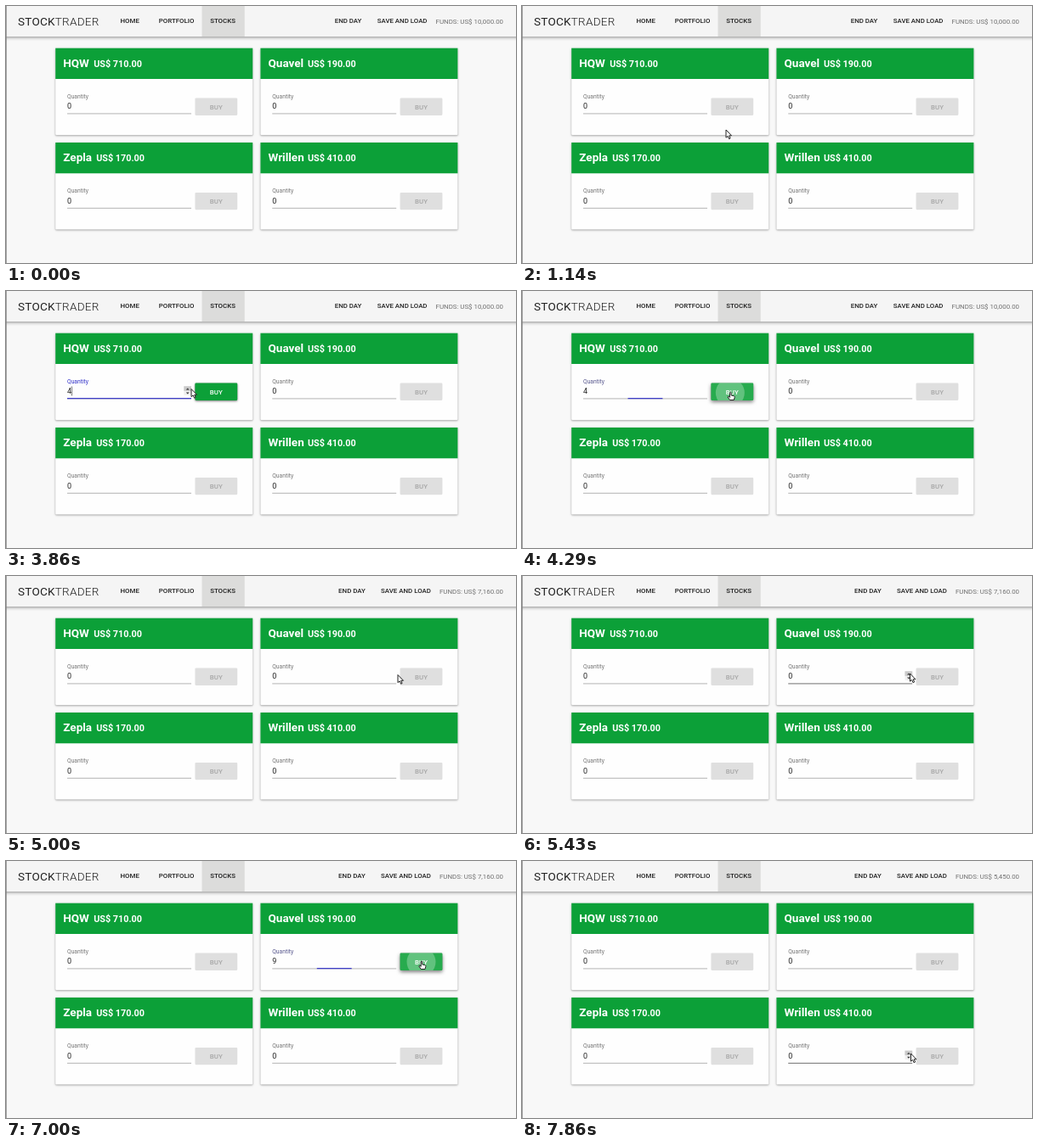
Animation, 600 px wide and 303 px high, one loop 8000 ms. Source, as an HTML page with a canvas:

```html
<!DOCTYPE html>
<html lang="en">
<head>
<meta charset="utf-8">
<title>Stock trader</title>
<style>
html, body { margin: 0; width: 100%; height: 100%; overflow: hidden; background: #f8f8f8; }
canvas { display: block; width: 600px; height: 303px; }
</style>
</head>
<body>
<canvas id="stage"></canvas>
<script>
const LOOP = 8000;
const GREEN = '#0ca038', BLUE = '#3030c8', INK = 'rgba(0,0,0,.87)';
const canvas = document.getElementById('stage');
const ctx = canvas.getContext('2d');
const dpr = window.devicePixelRatio || 1;
canvas.width = 600 * dpr;
canvas.height = 303 * dpr;
ctx.scale(dpr, dpr);

const cards = [
  { name: 'HQW', price: '710.00', priceX: 45, dx: 0, dy: 0 },
  { name: 'Quavel', price: '190.00', priceX: 55.5, dx: 241.2, dy: 0 },
  { name: 'Zepla', price: '170.00', priceX: 48, dx: 0, dy: 111.3 },
  { name: 'Wrillen', price: '410.00', priceX: 55.5, dx: 241.2, dy: 111.3 }
];

// Pointer path: step, x, y
const path = [
  [1, 386, 172], [2, 362, 172], [3, 362, 172], [5, 335, 197], [6, 300, 190],
  [7, 265, 170], [8, 240, 146], [9, 223, 129], [10, 214, 121], [11, 213, 117],
  [12, 215, 116], [24, 215, 116], [27, 218, 115.5], [28, 231, 118],
  [29, 245, 119], [32, 246, 119], [33, 310, 119], [34, 405, 118],
  [35, 461, 116.5], [36, 459, 116], [38, 456.5, 115], [46, 456.5, 115],
  [47, 466, 117], [48, 489, 118], [50, 489, 118], [51, 488, 124],
  [52, 480, 165], [53, 466, 210], [54, 459, 226], [55, 457.5, 227]
];

const arrow = new Path2D('M0 0V9.2L2.1 7.4L3.6 10.7L5.1 10L3.7 6.8H6.5Z');
const hand = new Path2D('M-.8 .8Q0-.5 .8 .8V4L4.2 4.8Q5 5.2 4.8 6.4L4 9.5H-.8L-3.2 6Q-3 4.8-1.8 5.6L-.8 6.4Z');

// Steps run at seven per second, rounded to 10 ms
function stepAt(ms) {
  let n = 0;
  while (Math.round((n + 1) * 100 / 7) * 10 <= ms) n++;
  return n;
}

function pointerAt(n) {
  if (n < path[0][0]) return null;
  const i = path.findIndex(p => p[0] >= n);
  const b = path[i], a = path[Math.max(0, i - 1)];
  const k = b === a ? 0 : (n - a[0]) / (b[0] - a[0]);
  return { x: a[1] + (b[1] - a[1]) * k, y: a[2] + (b[2] - a[2]) * k };
}

function valueAt(card, n) {
  if (card === 0 && n >= 14 && n < 31) return n < 15 ? 1 : n < 17 ? 2 : n < 19 ? 3 : 4;
  if (card === 1 && n >= 39 && n < 50) return Math.min(9, n - 38);
  return 0;
}

// Fades in over two steps from `on`, out over two from `off`
function ramp(n, on, off, first, last) {
  if (n < on || n > off) return 0;
  return n === on ? first : n === off ? last : 1;
}

function text(str, x, y, size, weight, color, align = 'left', spacing = 0) {
  ctx.font = `${weight} ${size}px Roboto, sans-serif`;
  ctx.letterSpacing = spacing + 'px';
  ctx.textAlign = align;
  ctx.fillStyle = color;
  ctx.fillText(str, x, y);
  return ctx.measureText(str).width;
}

function rect(x, y, w, h, color) {
  ctx.fillStyle = color;
  ctx.fillRect(x, y, w, h);
}

function roundBox(x, y, w, h, color) {
  ctx.beginPath();
  ctx.roundRect(x, y, w, h, 1.1);
  ctx.fillStyle = color;
  ctx.fill();
}

function raised(dy, blur, alpha, draw) {
  ctx.save();
  ctx.shadowColor = `rgba(0,0,0,${alpha})`;
  ctx.shadowOffsetY = dy * dpr;
  ctx.shadowBlur = blur * dpr;
  draw();
  ctx.restore();
}

function drawToolbar(n) {
  raised(1.3, 4, .45, () => rect(-5, 0, 610, 36, '#f5f5f5'));
  rect(230.5, 0, 50.2, 36, '#dcdcdb');
  const w = text('STOCK', 14, 22.8, 13.5, 400, INK, 'left', .27);
  text('TRADER', 14 + w, 22.8, 13.5, 300, INK, 'left', .27);
  const nav = (label, x) => text(label, x, 20.3, 7.875, 500, INK);
  nav('HOME', 134.5);
  nav('PORTFOLIO', 179.8);
  nav('STOCKS', 240.2);
  const shift = n < 31 ? 0 : 4.4;
  nav('END DAY', 386.7 + shift);
  nav('SAVE AND LOAD', 436.7 + shift);
  const funds = n < 31 ? '10,000.00' : n < 50 ? '7,160.00' : '5,450.00';
  text('FUNDS: US$ ' + funds, 585, 20.6, 7.875, 400, '#6f6f6f', 'right');
}

function triangle(x, y, dir) {
  ctx.beginPath();
  ctx.moveTo(x - 1.9, y + dir);
  ctx.lineTo(x + 1.9, y + dir);
  ctx.lineTo(x, y - dir);
  ctx.fillStyle = '#333';
  ctx.fill();
}

function drawSpinner(pressed) {
  rect(209.3, 112.3, 8.7, 10.6, '#efefef');
  rect(209.3, 112.3, 8.7, 5.5, pressed ? '#707070' : '#c9c9c9');
  triangle(213.7, 115.5, 1);
  triangle(213.7, 120.4, -1);
}

function drawField(i, n, focus, hover) {
  const value = valueAt(i, n);
  text('Quantity', 72, 108.7, 6.75, 400, focus > .5 ? BLUE : focus ? '#55558c' : '#747474');
  const w = text(String(value), 72, 121.3, 9, 400, INK);
  rect(72, 126.6, 146, .7, hover && !focus ? 'rgba(0,0,0,.8)' : 'rgba(0,0,0,.42)');
  if (focus) rect(145 - 73 * focus, 126.1, 146 * focus, 1.15, BLUE);
  const blinkOff = i === 0 && n >= 22 && n < 25;
  if (focus > .5 && !blinkOff) rect(72.2 + w, 112.5, .6, 11, '#222');
  if (hover) drawSpinner(i === 0 && value !== valueAt(i, n - 1));
}

function drawButton(lit, hover, ripple, p) {
  const x = 222.4, y = 108.6, w = 49.8, h = 20.3;
  roundBox(x, y, w, h, '#dfdfdf');
  if (lit) {
    ctx.globalAlpha = lit;
    raised(hover ? 2 : 1, hover ? 4.5 : 2.5, .5, () => roundBox(x, y, w, h, GREEN));
    if (hover) roundBox(x, y, w, h, 'rgba(255,255,255,.11)');
    ctx.globalAlpha = 1;
  }
  text('BUY', x + w / 2, 121.6, 7.875, 500, lit > .5 ? '#fff' : '#a6a6a6', 'center');
  if (ripple) {
    ctx.save();
    ctx.beginPath();
    ctx.rect(x, y, w, h);
    ctx.clip();
    ctx.beginPath();
    ctx.arc(p.x - .5, p.y + 1, ripple.r, 0, 7);
    ctx.fillStyle = `rgba(255,255,255,${ripple.a})`;
    ctx.fill();
    ctx.restore();
  }
}

function drawCard(card, i, n, pointer) {
  const p = pointer ? { x: pointer.x - card.dx, y: pointer.y - card.dy } : { x: -99, y: -99 };
  const over = (x0, x1, y0, y1) => p.x >= x0 && p.x <= x1 && p.y >= y0 && p.y <= y1;
  const [on, press] = [[14, 30], [39, 49]][i] || [99, 99];
  const focus = ramp(n, on, press, .6, .28);
  const lit = ramp(n, on, press + 1, .55, .4);
  const ripple = n === press ? { r: 17, a: .27 }
    : n === press + 1 ? { r: 32, a: .15 } : null;
  const onButton = lit > 0 && over(222, 272, 108, 129);

  ctx.save();
  ctx.translate(card.dx, card.dy);
  raised(.8, 2.2, .42, () => roundBox(58.2, 49.7, 232, 102.5, '#fefefe'));
  rect(58.2, 49.7, 232, 36.3, GREEN);
  text(card.name, 67.3, 71.8, 13.5, 700, '#fff');
  text('US$ ' + card.price, 58.2 + card.priceX, 71.8, 10.8, 700, '#fff');
  drawField(i, n, focus, over(72, 218.5, 110, 127));
  drawButton(lit, onButton, ripple, p);
  ctx.restore();
  return onButton && n <= press;
}

function drawPointer(p, shape) {
  ctx.save();
  ctx.translate(p.x, p.y);
  ctx.lineWidth = 1;
  ctx.lineJoin = 'round';
  ctx.strokeStyle = '#222';
  ctx.fillStyle = '#fff';
  ctx.fill(shape);
  ctx.stroke(shape);
  ctx.restore();
}

function draw(ms) {
  const n = stepAt(ms);
  const pointer = pointerAt(n);
  rect(0, 0, 600, 303, '#f8f8f8');
  drawToolbar(n);
  let pointing = false;
  cards.forEach((card, i) => { pointing = drawCard(card, i, n, pointer) || pointing; });
  rect(0, 0, .7, 303, '#808080');
  if (pointer) drawPointer(pointer, pointing ? hand : arrow);
}

const start = performance.now();
function tick() {
  draw((performance.now() - start) % LOOP);
  requestAnimationFrame(tick);
}
tick();
</script>
</body>
</html>
```
